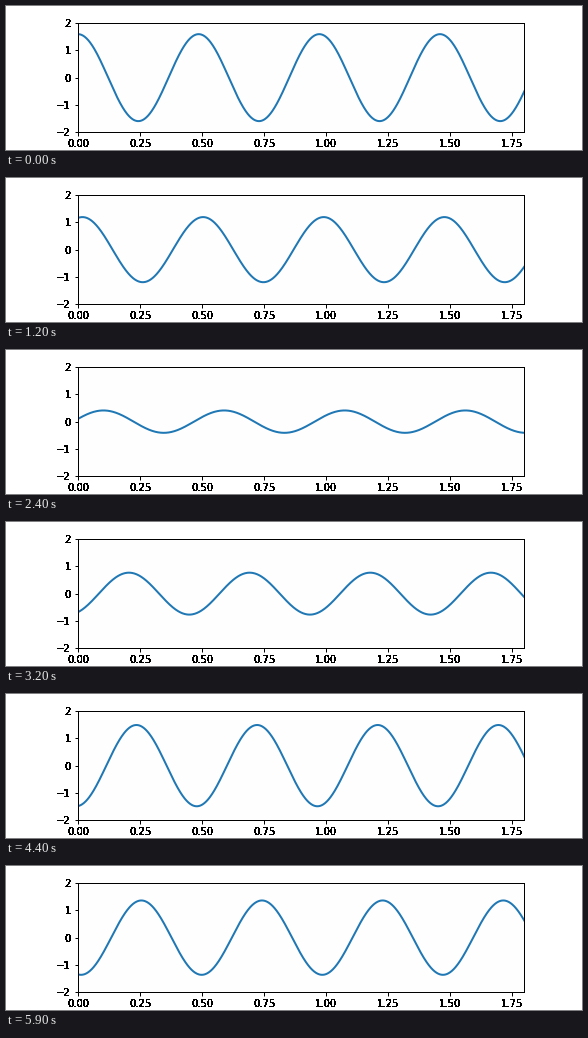
These frames come from a looping animation (576 px wide and 144 px high, 6 s). A matplotlib script:

```python
import numpy as np
import matplotlib.pyplot as plt
from matplotlib.animation import FuncAnimation

FRAMES = 60
INTERVAL = 100
LENGTH = 1.8
K = 2 * np.pi * 3.7 / LENGTH       # 3.7 wavelengths across the axis
OMEGA = 2 * np.pi / 100            # phase advance per frame
REFLECTION = 0.6

plt.rcParams.update({
    "font.family": "DejaVu Sans",
    "font.size": 10,
    "axes.linewidth": 1.0,
    "xtick.major.width": 1.0,
    "ytick.major.width": 1.0,
})


def harden(image, dpi):
    """Turn soft glyph edges into solid pixels."""
    image = image.copy()
    image[..., 3] = image[..., 3] > 0.12
    image[..., :3] = 0
    return image, 0, 0


def wave(x, frame):
    incident = np.cos(K * x - OMEGA * frame)
    reflected = REFLECTION * np.cos(K * x + OMEGA * frame)
    return incident + reflected


fig, ax = plt.subplots(figsize=(8, 2), dpi=72, facecolor="white")
fig.subplots_adjust(left=0.125, right=0.9, bottom=0.125, top=0.88)
ax.set_facecolor("#fefefe")
ax.set_xlim(0, LENGTH)
ax.set_ylim(-2, 2)
ax.set_xticks(np.arange(0, LENGTH, 0.25))
ax.set_yticks(range(-2, 3))
for label in ax.get_xticklabels() + ax.get_yticklabels():
    label.set_agg_filter(harden)

x = np.linspace(0, LENGTH, 1000)
line, = ax.plot(x, wave(x, 0), color="#1f77b4", lw=2)


def update(frame):
    line.set_ydata(wave(x, frame))
    return line,


anim = FuncAnimation(fig, update, frames=FRAMES, interval=INTERVAL,
                     repeat=True, repeat_delay=0, blit=False)
plt.show()
```
